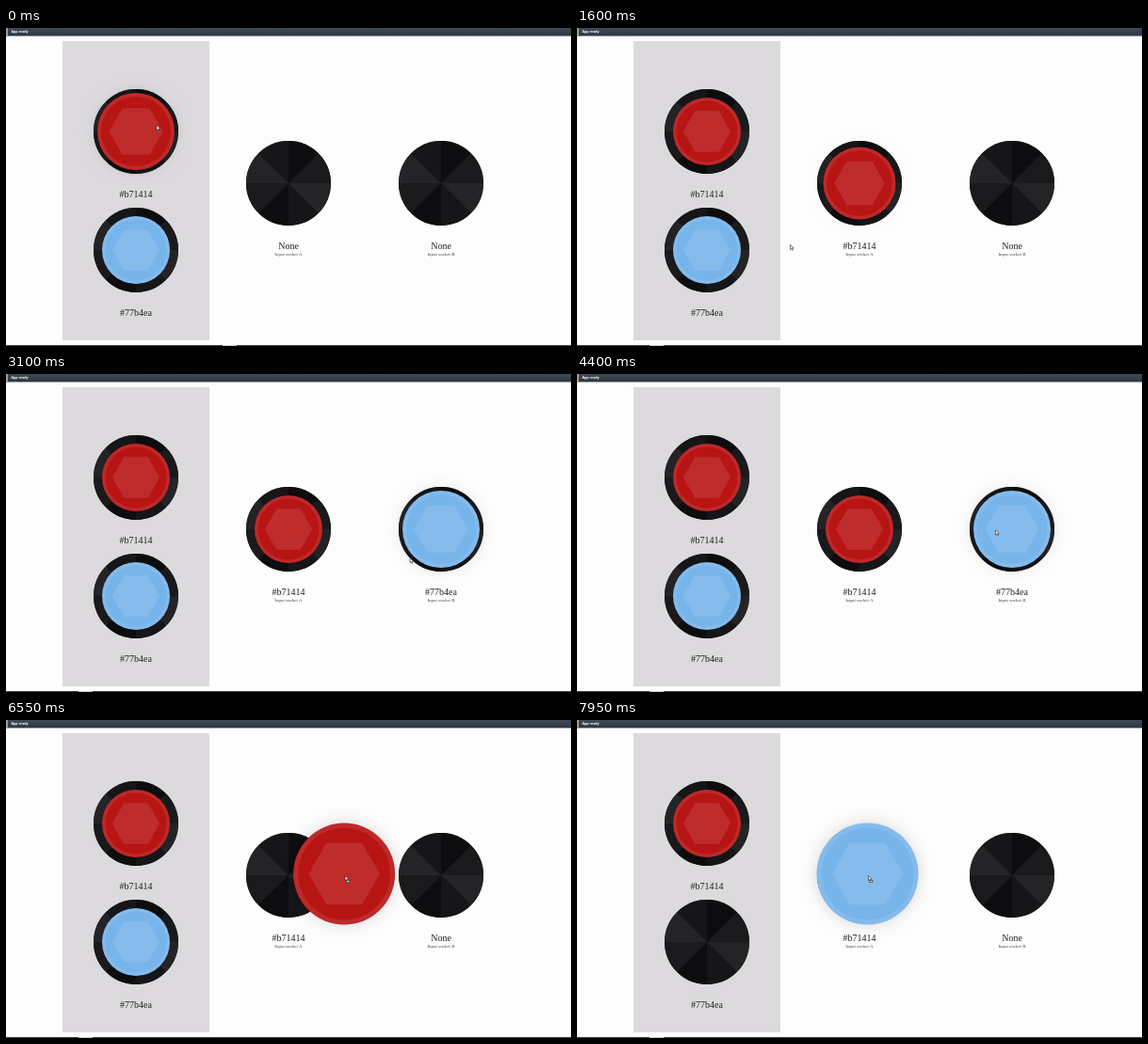
Animation of 600x338 px, one loop 8000 ms. Source, as an HTML page with a canvas:

```html
<!DOCTYPE html>
<html lang="en">
<head>
<meta charset="utf-8">
<title>Color sockets</title>
<style>
html, body { margin: 0; width: 100%; height: 100%; overflow: hidden; background: #fefdfe; }
canvas { display: block; width: 600px; height: 338px; }
</style>
</head>
<body>
<canvas id="stage"></canvas>
<script>
const LOOP = 8000;
const RED = '#b71414', BLUE = '#77b4ea';
const REST = 36, HOVER = 41, DRAG = 54;
const SLOT_RADIUS = 45;
const SHADES = ['#0d0c0e', '#1a191b', '#242326', '#161518'];

const slots = {
  red: [138, 110],
  blue: [138, 236],
  a: [300, 165],
  b: [462, 165]
};

// Pointer path: time, x, y
const pointerPath = [
  [0, 160, 103.5], [450, 158, 105], [850, 139, 111], [920, 139, 111],
  [1300, 299, 167], [1370, 299, 167], [1600, 226.5, 230.5], [2000, 141, 238],
  [2150, 141, 238], [2680, 464, 168], [2780, 463, 168], [3100, 429, 195.5],
  [3600, 436, 186], [4150, 444.5, 166], [4500, 444.5, 166], [4850, 380, 222],
  [4920, 380, 222], [5180, 301, 162], [5250, 301, 162], [5480, 370, 142],
  [5750, 452.5, 169.5], [6000, 448, 166], [6300, 444, 165], [6750, 301, 166],
  [6850, 300, 166], [7230, 142, 223.5], [7480, 142, 223.5], [7950, 309.5, 165.5],
  [8000, 310, 165.5]
];

// Each gem lives from its first to its last key: time, radius
const gems = [
  [RED, 'red', [[0, HOVER], [900, HOVER]]],
  [RED, 'red', [[1350, REST], [LOOP, REST]]],
  [BLUE, 'blue', [[0, REST], [1870, REST], [2050, HOVER], [2150, HOVER]]],
  [BLUE, 'blue', [[2750, REST], [7180, REST], [7400, HOVER], [7480, HOVER]]],
  [RED, 'a', [[1350, DRAG], [1500, HOVER], [1700, REST], [5130, REST], [5240, HOVER], [5250, HOVER]]],
  [RED, 'a', [[6800, DRAG], [6950, HOVER], [7150, REST], [LOOP, REST]]],
  [BLUE, 'b', [[2750, DRAG], [2900, HOVER], [4500, HOVER]]],
  [RED, 'pointer', [[900, HOVER], [1050, DRAG], [1350, DRAG]]],
  [BLUE, 'pointer', [[2150, HOVER], [2300, DRAG], [2750, DRAG]]],
  [BLUE, 'pointer', [[4500, HOVER], [4650, DRAG], [4900, DRAG]]],
  [RED, 'pointer', [[5250, HOVER], [5400, DRAG], [6800, DRAG]]],
  [BLUE, 'pointer', [[7480, HOVER], [7630, DRAG], [LOOP, DRAG]]]
];

const canvas = document.getElementById('stage');
const ctx = canvas.getContext('2d');
const density = window.devicePixelRatio || 1;
canvas.width = 600 * density;
canvas.height = 338 * density;

function sample(keys, t) {
  let i = 1;
  while (i < keys.length - 1 && t >= keys[i][0]) i++;
  const from = keys[i - 1], to = keys[i];
  const u = Math.min(1, Math.max(0, (t - from[0]) / (to[0] - from[0])));
  const ease = u * u * (3 - 2 * u);
  return from.slice(1).map((v, k) => v + (to[k + 1] - v) * ease);
}

function rect(color, x, y, w, h) {
  ctx.fillStyle = color;
  ctx.fillRect(x, y, w, h);
}

function disc(color, x, y, r) {
  ctx.fillStyle = color;
  ctx.beginPath();
  ctx.arc(x, y, r, 0, 2 * Math.PI);
  ctx.fill();
}

function label(text, x, y, size = 10, color = '#222') {
  ctx.font = `${size}px "Liberation Serif", serif`;
  ctx.textAlign = 'center';
  ctx.fillStyle = color;
  ctx.fillText(text, x, y);
}

function drawFrame(t) {
  rect('#fefdfe', 0, 0, 600, 338);
  const bar = ctx.createLinearGradient(0, 0, 0, 8.5);
  bar.addColorStop(0, '#414b57');
  bar.addColorStop(1, '#2c353f');
  rect(bar, 0, 0, 600, 8.5);
  rect('#a39c90', 0, 0, 2, 8.5);
  ctx.font = 'bold 3.6px "Open Sans", sans-serif';
  ctx.textAlign = 'left';
  ctx.fillStyle = '#fff';
  ctx.fillText('App ready', 5.5, 5.4);
  rect('#dcdadc', 60, 14, 156, 318);
  rect('#3a3a3c', 0, 337, 600, 1);
  rect('#c8c8c8', t < 400 ? 230 : 77, 337, 15, 1);
}

function drawSlot([x, y]) {
  disc(SHADES[3], x, y, SLOT_RADIUS);
  for (let i = 0; i < 8; i++) {
    const start = (i - 2) * Math.PI / 4;
    ctx.fillStyle = SHADES[i % 4];
    ctx.beginPath();
    ctx.moveTo(x, y);
    ctx.arc(x, y, SLOT_RADIUS, start, start + Math.PI / 4);
    ctx.fill();
  }
}

function drawGem(color, x, y, r) {
  const lift = Math.min(1, Math.max(0, (r - REST) / (HOVER - REST)));
  ctx.save();
  ctx.shadowColor = `rgba(0, 0, 0, ${0.15 * lift})`;
  ctx.shadowBlur = 16 * density;
  disc(color, x, y, r);
  ctx.restore();
  disc('rgba(255, 255, 255, .09)', x, y, r);
  disc(color, x, y, r * 0.905);
  ctx.fillStyle = 'rgba(255, 255, 255, .1)';
  ctx.beginPath();
  for (let i = 0; i < 6; i++) {
    const angle = i * Math.PI / 3;
    ctx.lineTo(x + r * 0.7 * Math.cos(angle), y + r * 0.7 * Math.sin(angle));
  }
  ctx.fill();
}

function drawPointer(x, y, dragging) {
  ctx.save();
  ctx.translate(x, y);
  ctx.lineWidth = 0.6;
  ctx.strokeStyle = '#222';
  ctx.fillStyle = '#fff';
  if (dragging) {
    ctx.fillRect(1.2, 4.8, 3.2, 2.2);
    ctx.strokeRect(1.2, 4.8, 3.2, 2.2);
  }
  ctx.beginPath();
  [[0, 0], [0, 5], [1.2, 4], [2, 5.8], [2.8, 5.4], [2, 3.7], [3.6, 3.6]]
    .forEach(([px, py]) => ctx.lineTo(px, py));
  ctx.closePath();
  ctx.fill();
  ctx.stroke();
  ctx.restore();
}

function draw(t) {
  ctx.setTransform(density, 0, 0, density, 0, 0);
  drawFrame(t);
  Object.values(slots).forEach(drawSlot);

  label(RED, 138, 180);
  label(BLUE, 138, 306);
  label(t < 1350 ? 'None' : RED, 300, 235);
  label(t >= 2750 && t < 4900 ? BLUE : 'None', 462, 235);
  label('Input socket A', 300, 242, 5, '#444');
  label('Input socket B', 462, 242, 5, '#444');

  const [px, py] = sample(pointerPath, t);
  let dragging = false;
  for (const [color, place, keys] of gems) {
    if (t < keys[0][0] || t >= keys[keys.length - 1][0]) continue;
    const held = place === 'pointer';
    const [x, y] = held ? [px - 1, py - 2] : slots[place];
    drawGem(color, x, y, sample(keys, t)[0]);
    dragging = dragging || held;
  }
  drawPointer(px, py, dragging);
}

const began = performance.now();
function tick() {
  draw((performance.now() - began) % LOOP);
  requestAnimationFrame(tick);
}
tick();
</script>
</body>
</html>
```
